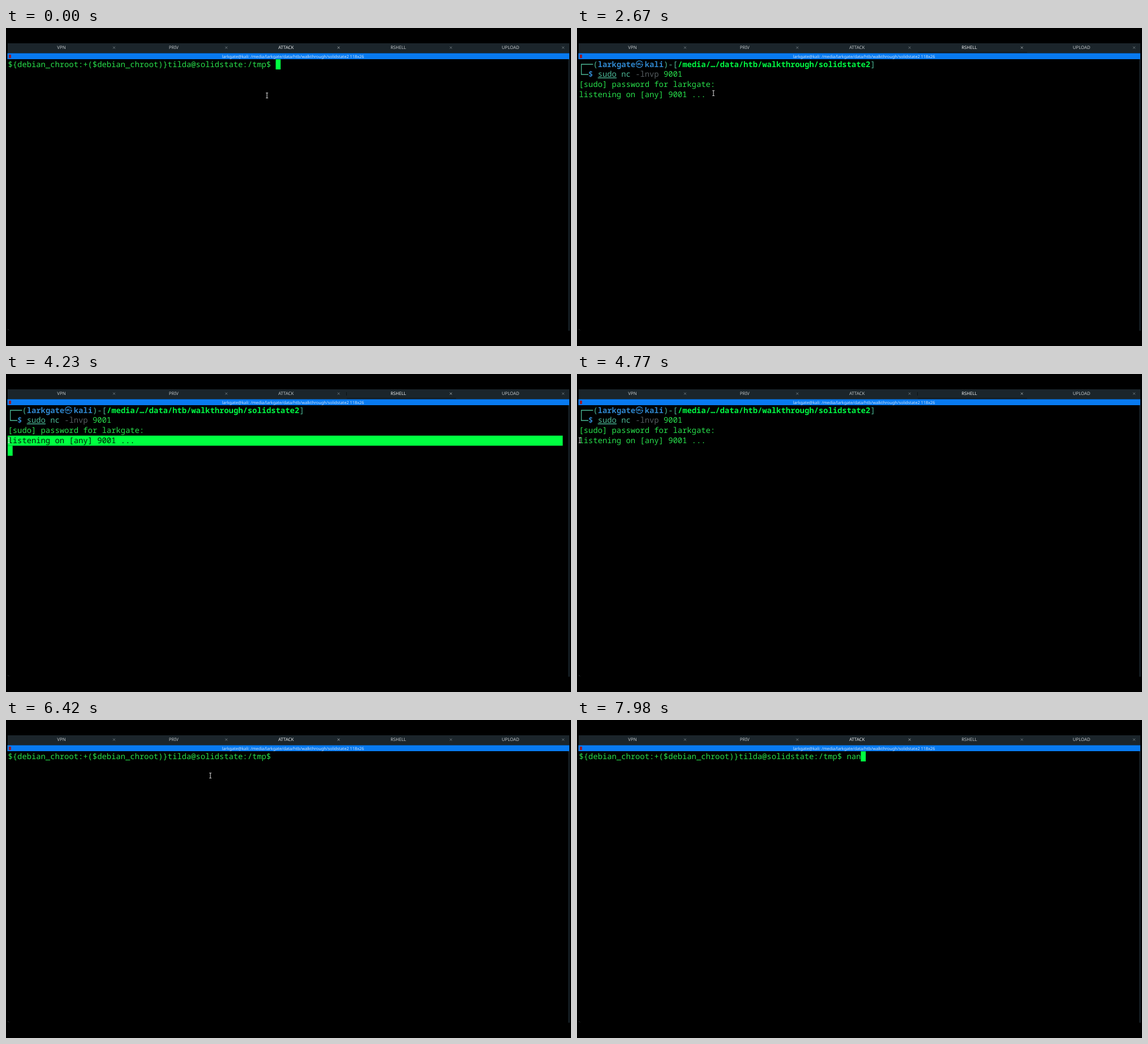
An HTML page that plays this animation: 998x561 px, repeating every 8 s.

```html
<!DOCTYPE html>
<html lang="en">
<head>
<meta charset="utf-8">
<title>Terminal</title>
<style>
  html, body { margin: 0; width: 100%; height: 100%; overflow: hidden; background: #000; }
  svg { display: block; width: 998px; height: 561px; }
  text { white-space: pre; text-rendering: geometricPrecision; }
  .mono { font: 500 13.84px "Noto Sans Mono", "DejaVu Sans Mono", monospace; }
  .ui { font: 7.8px "Noto Sans", "Open Sans", sans-serif; text-anchor: middle; }
  .title { font-size: 7.3px; fill: #d3e6fb; }
</style>
</head>
<body>
<svg id="stage" viewBox="0 0 998 561">
  <rect x="3" y="27" width="992" height="17.5" fill="#1b252b"/>
  <g id="tabs"></g>
  <rect id="tabLine" y="42.3" width="193" height="1.2" fill="#10171c"/>
  <path id="divider" d="M601.5 32V38" stroke="#0a0f13"/>
  <rect x="2.5" y="44.5" width="992.5" height="10.5" fill="#087af0"/>
  <rect x="5" y="47" width="4" height="6" fill="#9c1c2a"/>
  <text class="ui title" x="507" y="52.6">larkgate@kali: /media/larkgate/data/htb/walkthrough/solidstate2 118x26</text>
  <rect x="993" y="55" width="3" height="479" fill="#141d23"/>
  <path d="M3 531l2.5 2.5" stroke="#3a4248" stroke-width=".7"/>
  <rect id="selection" fill="#00ff41"/>
  <rect id="block" fill="#00ff41"/>
  <g id="attack" class="mono"></g>
  <g id="listener" class="mono">
    <path d="M28.4 64H7.7V82H20.1" fill="none" stroke="#4cb896" stroke-width="1.3"/>
  </g>
  <path id="beam" d="M-2 -4.5H2M0 -4.5V4.5M-2 4.5H2" fill="none" stroke="#c4c4c4" stroke-width="1.2"/>
  <path id="arrow" d="M0 0V9.2L2.1 7.3L3.6 11L5.2 10.3L3.7 6.8H6.6Z" fill="#050505" stroke="#e8e8e8" stroke-width=".9"/>
</svg>
<script>
const LOOP = 8000, BLINK = 1100;
const LEFT = 3.5, TOP = 55.3, CELL = 8.305, ROW = 17.8;
const TO_LISTENER = 1740, TO_ATTACK = 5720;
const SELECT = 3250, DESELECT = 4500;
const KEYS = [7400, 7650, 7850];
const GREEN = '#28e04c', BRIGHT = '#00f642', TEAL = '#4cb896', BLUE = '#2f86cc', GREY = '#555c60';
const PROMPT = '${debian_chroot:+($debian_chroot)}tilda@solidstate:/tmp$ ';

const $ = id => document.getElementById(id);

function add(parent, name, attrs, text = '') {
  const el = document.createElementNS('http://www.w3.org/2000/svg', name);
  for (const key in attrs) el.setAttribute(key, attrs[key]);
  el.textContent = text;
  return parent.appendChild(el);
}

// Places one run of text on the character grid.
const put = (parent, row, col, text, fill = GREEN, attrs = {}) =>
  add(parent, 'text', { x: LEFT + col * CELL, y: TOP + 13.2 + row * ROW, fill, ...attrs }, text);

const bold = { 'font-weight': 700 };
const prompt = put($('attack'), 0, 0, PROMPT);
const listener = $('listener');
put(listener, 0, 3, '(', TEAL);
put(listener, 0, 4, 'larkgate', BLUE, bold);
put(listener, 0, 12, '㉿', BLUE, { style: 'font-family:"Noto Sans CJK JP","Noto Sans CJK",sans-serif', ...bold });
put(listener, 0, 14, 'kali', BLUE, bold);
put(listener, 0, 18, ')-[', TEAL);
put(listener, 0, 21, '/media/…/data/htb/walkthrough/solidstate2', BRIGHT, bold);
put(listener, 0, 62, ']', TEAL);
put(listener, 1, 2, '$', BLUE, bold);
put(listener, 1, 4, 'sudo', TEAL, { 'text-decoration': 'underline' });
put(listener, 1, 9, 'nc', TEAL);
put(listener, 1, 12, '-lnvp', GREY);
put(listener, 1, 18, '9001');
put(listener, 2, 0, '[sudo] password for larkgate:');
const listening = put(listener, 3, 0, 'listening on [any] 9001 ...');

const tabs = ['VPN', 'PRIV', 'ATTACK', 'RSHELL', 'UPLOAD'].map((label, i) => {
  const x = 98 + i * 198.3;
  return [
    add($('tabs'), 'text', { class: 'ui', x, y: 37.2 }, label),
    add($('tabs'), 'path', { d: `M${x + 91} 32.7l3.8 3.8m0 -3.8l-3.8 3.8`, 'stroke-width': .8 })
  ];
});

// Mouse stops: time, x, y. Movement between them is eased.
const STOPS = [
  [0, 461, 119], [880, 461, 119], [1320, 699.5, 33.5], [1800, 699.5, 33.5],
  [2450, 241, 115], [2900, 241, 115], [3220, 5, 117], [5040, 5, 117],
  [5560, 480.5, 27.5], [5850, 480.5, 27.5], [6350, 361, 98], [LOOP, 361, 98]
];

function mouseAt(t) {
  const i = STOPS.findIndex(stop => stop[0] > t);
  const [t0, x0, y0] = STOPS[i - 1], [t1, x1, y1] = STOPS[i];
  const u = (t - t0) / (t1 - t0), k = u * u * (3 - 2 * u);
  return [x0 + (x1 - x0) * k, y0 + (y1 - y0) * k];
}

const show = (el, on) => el.setAttribute('visibility', on ? 'visible' : 'hidden');

function box(el, row, col, cols) {
  const attrs = { x: LEFT - .5 + col * CELL, y: TOP + row * ROW, width: cols * CELL + .4, height: ROW };
  for (const key in attrs) el.setAttribute(key, attrs[key]);
}

function draw(t) {
  const onListener = t >= TO_LISTENER && t < TO_ATTACK;
  const typed = KEYS.filter(time => t >= time).length;
  show($('attack'), !onListener);
  show(listener, onListener);
  prompt.textContent = PROMPT + 'nan'.slice(0, typed);

  const active = onListener ? 3 : 2;
  tabs.forEach(([label, cross], i) => {
    label.setAttribute('fill', i === active ? '#eef0f1' : '#c3c8cb');
    cross.setAttribute('stroke', i === active ? '#b4babd' : '#7d868b');
  });

  const selected = t >= SELECT && t < DESELECT;
  show($('selection'), selected);
  box($('selection'), 3, 0, 118);
  listening.setAttribute('fill', selected ? '#001a06' : GREEN);

  // Blinking restarts with each tab change and key press.
  const restart = [0, TO_LISTENER, TO_ATTACK, ...KEYS].filter(time => time <= t).pop();
  show($('block'), (t - restart) % BLINK < BLINK / 2);
  box($('block'), onListener ? 4 : 0, onListener ? 0 : PROMPT.length + typed, 1);

  const [x, y] = mouseAt(t), overTabs = y < 55;
  for (const id of ['beam', 'arrow']) {
    $(id).setAttribute('transform', `translate(${x} ${y})`);
    show($(id), !typed && overTabs === (id === 'arrow'));
  }

  const hovered = overTabs && x > 602 && x < 796;
  show($('tabLine'), onListener || hovered);
  $('tabLine').setAttribute('x', 602);
  show($('divider'), onListener && t > 2900);
}

function frame() {
  draw(performance.now() % LOOP);
  requestAnimationFrame(frame);
}
frame();
</script>
</body>
</html>
```
